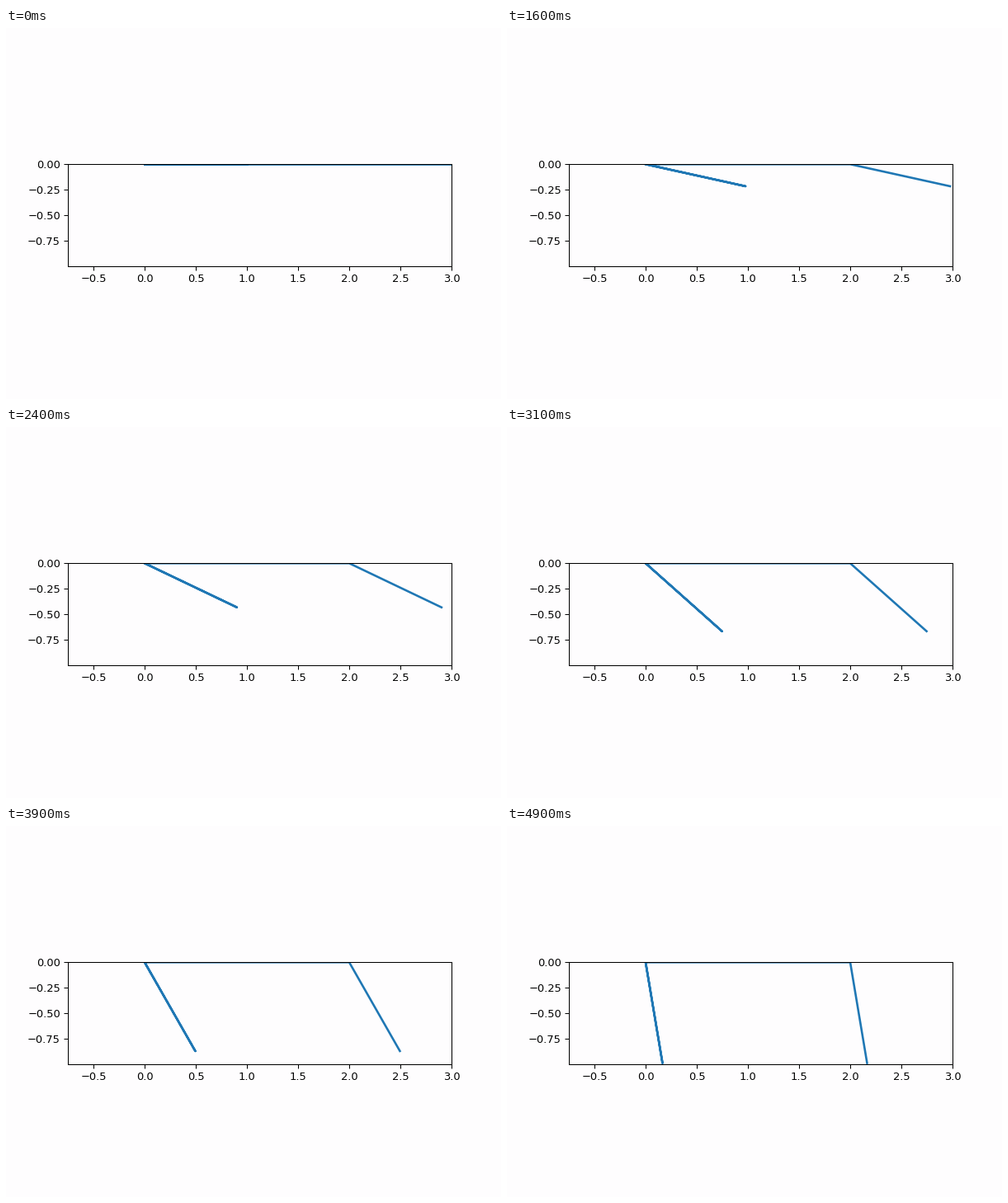
Recreate the animation shown at these times as a matplotlib script. Size 600 by 450 pixels, loop 5 s.

```python
import numpy as np
import matplotlib.pyplot as plt
from matplotlib.animation import FuncAnimation

FRAMES = 50
INTERVAL = 100
SPAN = 2.0  # distance between the two hinges
PAPER = "#fefdfe"

# Swing of the arms below the horizontal, in radians.
KEY_STEPS = np.array([0, 6, 12, 16, 24, 30, 36, 42, 49])
KEY_ANGLES = np.array([0, 0.048, 0.135, 0.217, 0.446, 0.687, 0.932, 1.168, 1.405])
KEY_SPEEDS = np.gradient(KEY_ANGLES, KEY_STEPS)
KEY_SPEEDS[0] = 0.0045


def swing(step):
    """Cubic Hermite interpolation of the arm angle."""
    k = min(np.searchsorted(KEY_STEPS, step, side="right"), len(KEY_STEPS) - 1) - 1
    width = KEY_STEPS[k + 1] - KEY_STEPS[k]
    s = (step - KEY_STEPS[k]) / width
    a, b = KEY_ANGLES[k:k + 2]
    va, vb = KEY_SPEEDS[k:k + 2] * width
    blend = s * s * (3 - 2 * s)
    return a + (b - a) * blend + va * s * (1 - s) ** 2 - vb * s * s * (1 - s)


fig, ax = plt.subplots(figsize=(6.4, 4.8), dpi=93.75, facecolor=PAPER)
ax.set_facecolor(PAPER)
ax.set_aspect("equal")
ax.set_xlim(-0.75, 3)
ax.set_ylim(-1, 0)
ax.set_yticks([-0.75, -0.5, -0.25, 0])
linkage, = ax.plot([], [], color="tab:blue", lw=2)


def update(step):
    angle = swing(step)
    dx, dy = np.cos(angle), -np.sin(angle)
    # The left arm is traced out and back before crossing to the right hinge.
    linkage.set_data([0, dx, 0, SPAN, SPAN + dx], [0, dy, 0, 0, dy])
    return linkage,


anim = FuncAnimation(fig, update, frames=FRAMES, interval=INTERVAL,
                     repeat=True, repeat_delay=0)
plt.show()
```
